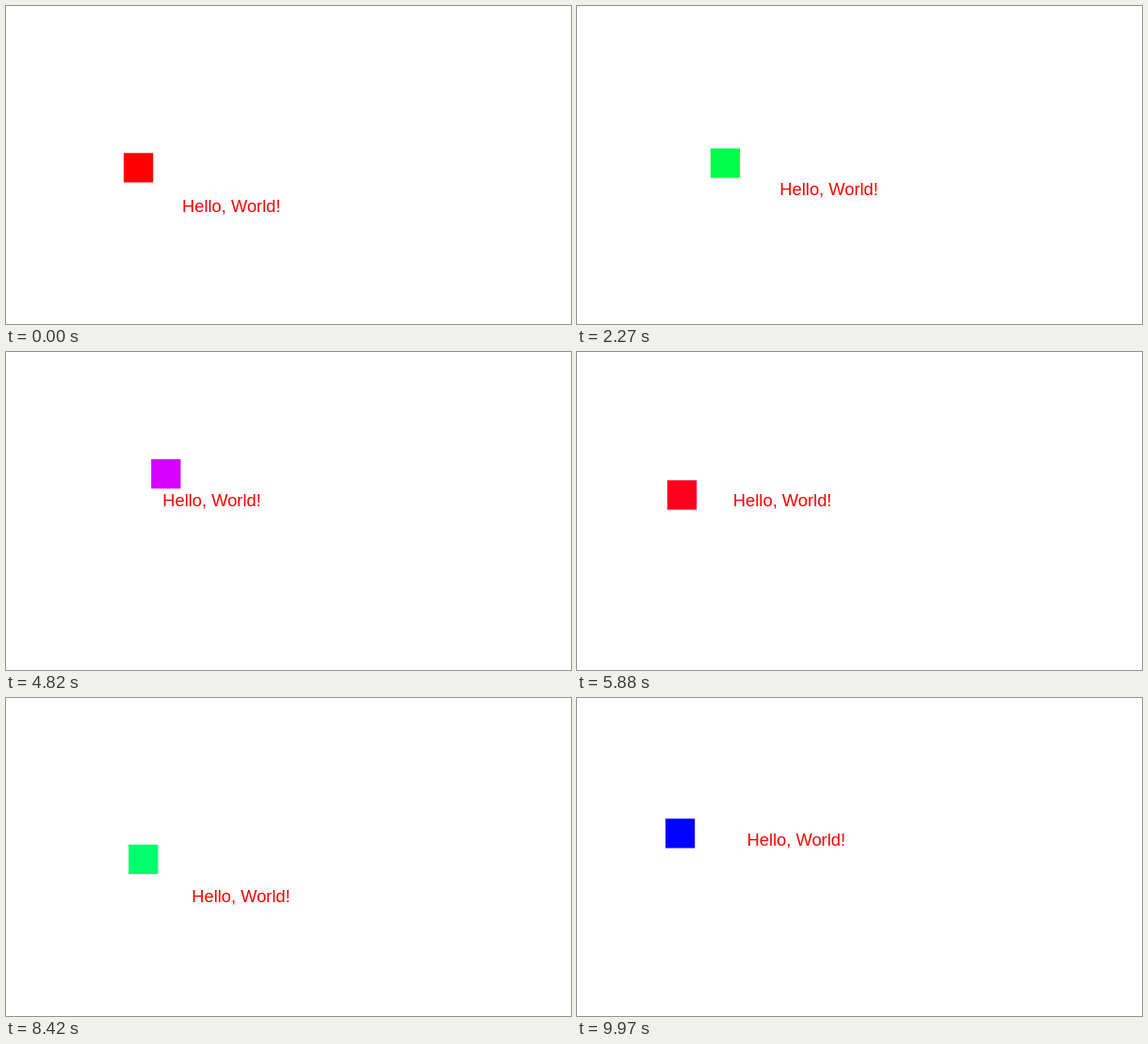
An HTML page with a canvas that plays this animation: 600x338 px, repeating every 10000 ms.

```html
<!DOCTYPE html>
<html lang="en">
<head>
<meta charset="utf-8">
<title>Orbiting square and text</title>
<style>
  html, body { margin: 0; width: 100%; height: 100%; overflow: hidden; background: #fff; }
  canvas { display: block; }
</style>
</head>
<body>
<canvas id="stage" width="600" height="338"></canvas>
<script>
const ctx = document.getElementById('stage').getContext('2d');
const LOOP = 10000;
const FPS = 33;
const FRAMES = 330;
const TICKS = 60;
const RADIUS = 31.25;
const SIDE = 31.25;

const orbit = (cx, cy, angle) => [
  cx + RADIUS * Math.sin(angle),
  cy + RADIUS * Math.cos(angle)
];

// Steps at 33 fps, each showing the next 60 Hz tick.
function sceneTime(ms) {
  const step = Math.min(FRAMES - 1, Math.floor((ms + 5) * FPS / 1000));
  return Math.ceil(step * TICKS / FPS - 1e-9) / TICKS;
}

function draw(seconds) {
  ctx.fillStyle = '#fff';
  ctx.fillRect(0, 0, 600, 338);

  const [sx, sy] = orbit(125, 125, 3 * seconds);
  ctx.fillStyle = `hsl(${(60 * seconds) % 360}, 100%, 50%)`;
  ctx.fillRect(sx, sy, SIDE, SIDE);

  const [tx, ty] = orbit(187, 187.5, 6 * seconds);
  ctx.fillStyle = '#f00';
  ctx.font = '18.33px "Liberation Sans", Arial, sans-serif';
  ctx.textBaseline = 'alphabetic';
  ctx.fillText('Hello, World!', tx, ty);
}

const start = performance.now();

function tick() {
  draw(sceneTime((performance.now() - start) % LOOP));
  requestAnimationFrame(tick);
}

tick();
</script>
</body>
</html>
```
